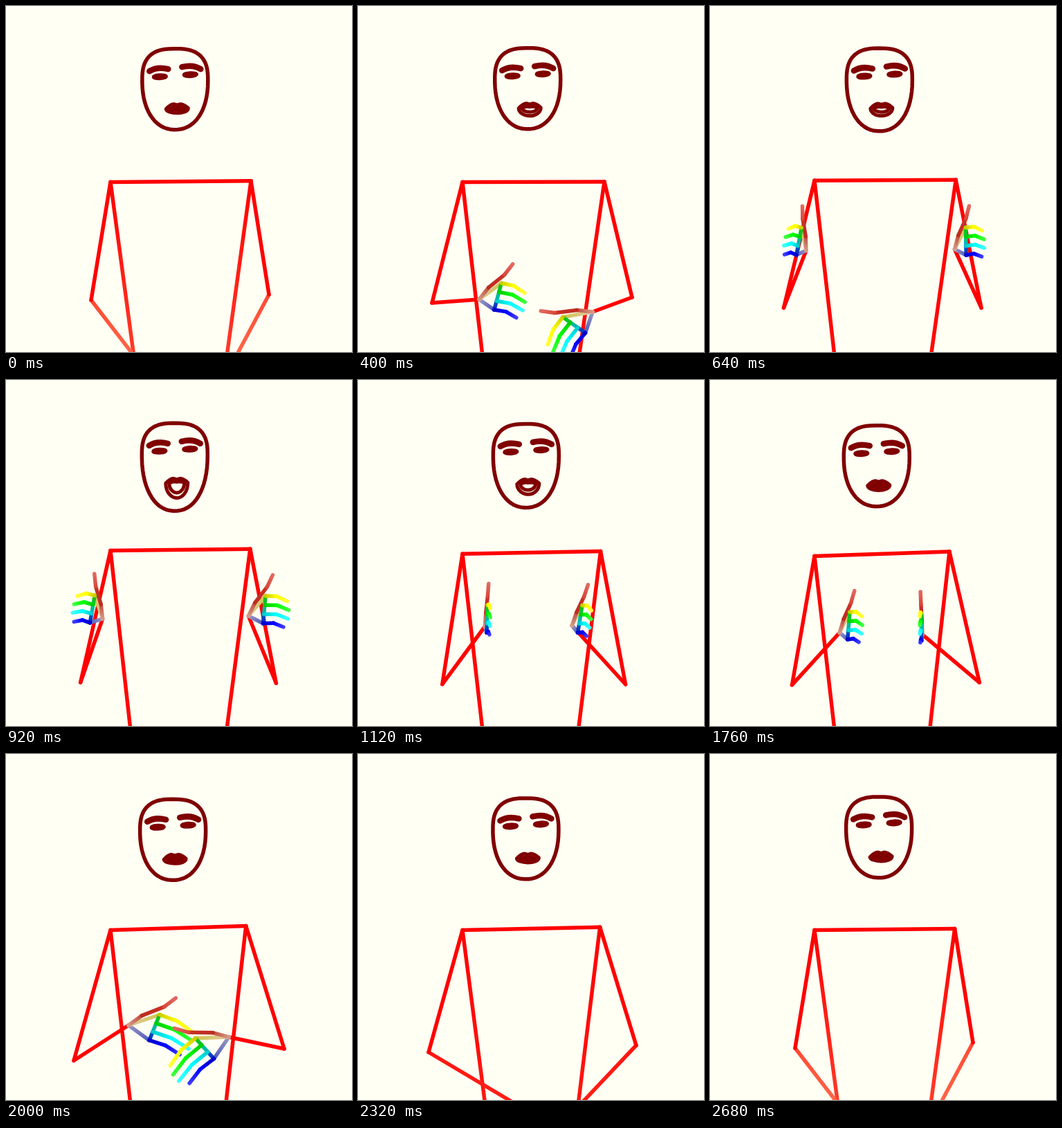
An HTML page with a canvas that plays this animation: 500x500 px, repeating every 2.72 s.

```html
<!DOCTYPE html>
<html lang="en">
<head>
<meta charset="utf-8">
<title>Gesturing figure</title>
<style>
html, body { margin: 0; width: 100%; height: 100%; overflow: hidden; background: #fffff4; }
canvas { display: block; width: 500px; height: 500px; }
</style>
</head>
<body>
<canvas id="stage" width="500" height="500"></canvas>
<script>
const ctx = document.getElementById('stage').getContext('2d');
const LOOP = 2720, STEP = 40, DARK = '#800000';

// turn: signed length of the visible palm; tilt: slope of the hand in degrees.
const arm = (elbow, wrist, turn, tilt) => ({ elbow, wrist, turn, tilt });
const rest = [arm([123, 425], [204, 530], 30, 90), arm([380, 417], [317, 535], -30, -90)];
const present = [arm([107, 429], [175, 424], 25, 15), arm([396, 421], [339, 442], -31, -55)];
const open = [arm([108, 437], [141, 345], -17, 10), arm([390, 438], [349, 341], 22, 5)];
const front = [arm([124, 440], [190, 358], 6, 0), arm([386, 440], [303, 357], 8, 10)];
const clasp = [arm([98, 443], [177, 392], 36, 22), arm([402, 426], [322, 409], -37, -42)];
const lower = [arm([102, 431], [235, 510], 30, 90), arm([402, 421], [315, 513], -30, -90)];

const timeline = [[0, rest], [400, present], [700, open], [920, open], [1180, front],
  [1660, front], [2000, clasp], [2320, lower], [2680, rest], [LOOP, rest]];

const mix = (a, b, u) => a + (b - a) * u;
const between = (p, q, u) => [mix(p[0], q[0], u), mix(p[1], q[1], u)];
const bump = (t, center, width) => Math.exp(-(((t - center) / width) ** 2));
const tint = f => `rgb(255, ${Math.round(235 * f)}, ${Math.round(165 * f)})`;
const hsl = (hue, light, sat = 100) => `hsl(${hue}, ${sat}%, ${light}%)`;

function armsAt(t) {
  const next = timeline.findIndex(([time]) => time > t);
  const [t0, from] = timeline[next - 1], [t1, to] = timeline[next];
  const u = (t - t0) / (t1 - t0), e = u * u * (3 - 2 * u);
  const spread = bump(t, 760, 90);
  return from.map((a, i) => {
    const b = to[i], out = i ? spread : -spread;
    const elbow = between(a.elbow, b.elbow, e), wrist = between(a.wrist, b.wrist, e);
    elbow[0] += 8 * out;
    wrist[0] += 33 * out;
    return arm(elbow, wrist, mix(a.turn, b.turn, e), mix(a.tilt, b.tilt, e));
  });
}

function stroke(color, width) {
  ctx.strokeStyle = color;
  ctx.lineWidth = width;
  ctx.stroke();
}

function line(a, b, from, to = from) {
  const g = ctx.createLinearGradient(...a, ...b);
  g.addColorStop(0, from);
  g.addColorStop(1, to);
  ctx.beginPath();
  ctx.moveTo(...a);
  ctx.lineTo(...b);
  stroke(g, 5.5);
}

function outline(jaw) {
  const power = (x, n) => Math.sign(x) * Math.abs(x) ** (2 / n);
  ctx.beginPath();
  for (let a = 0; a < 2 * Math.PI; a += .1) {
    const s = Math.sin(a), n = s > 0 ? 2.2 : 2.7;
    ctx.lineTo(245 + 47.5 * power(Math.cos(a), n), 108 + (s > 0 ? 71 + jaw : 46) * power(s, n));
  }
  ctx.closePath();
  stroke(DARK, 5.5);
}

function lips(w, up, down) {
  ctx.beginPath();
  ctx.moveTo(-w, 0);
  ctx.quadraticCurveTo(-.6 * w, -up, -.3 * w, -up);
  ctx.lineTo(0, -.8 * up);
  ctx.lineTo(.3 * w, -up);
  ctx.quadraticCurveTo(.6 * w, -up, w, -1);
  ctx.bezierCurveTo(w, down * .6, .5 * w, down, 0, down);
  ctx.bezierCurveTo(-.5 * w, down, -w, down * .6, -w, 0);
  ctx.closePath();
  stroke(DARK, 5);
}

function drawFace(x, y, jaw, mouth) {
  ctx.save();
  ctx.translate(x, y);
  outline(jaw);
  for (const side of [-1, 1]) {
    const cx = 245 + 22 * side, lift = 1.5 * side;
    ctx.beginPath();
    ctx.ellipse(cx, 101 - lift, 9, 2.4, -.05, 0, 7);
    stroke(DARK, 5.2);
    ctx.beginPath();
    ctx.moveTo(cx + 15 * side, 93 - lift);
    ctx.quadraticCurveTo(cx + 4 * side, 86 - lift, cx - 12 * side, 90 - lift);
    stroke(DARK, 8.5);
  }
  ctx.translate(248, 149);
  lips(16, 7, 6 + mouth);
  lips(11, 2.5, 1.5 + mouth * .8);
  ctx.restore();
}

function drawHand({ wrist, turn, tilt }) {
  const angle = tilt * Math.PI / 180, c = Math.cos(angle), s = Math.sin(angle);
  // along runs in palm lengths, up in pixels towards the thumb
  const at = (along, up) =>
    [wrist[0] + turn * along * c + up * s, wrist[1] + turn * along * s - up * c];
  const bases = [0, 1, 2, 3].map(i => at(1, 31 - 13.3 * i));
  const thumb = [at(.35, 20), at(1.05, 44), at(1.35, 62)];

  line(wrist, bases[3], '#9a9ac4', '#5058bc');
  line(wrist, bases[0], '#e0c8a0', '#d2c650');
  line(wrist, thumb[0], '#d69a88', '#c04a3c');
  line(thumb[0], thumb[1], '#bc2c20', '#cc3226');
  line(thumb[1], thumb[2], '#d8483c', '#e26a60');
  bases.slice(1).forEach((b, i) => line(bases[i], b, hsl(110 + 50 * i, 38), hsl(140 + 45 * i, 38)));
  bases.forEach((base, i) => {
    const hue = 60 * (i + 1), length = 2.45 + (i % 3 ? .15 : -.1 * (i / 3));
    const knee = at(mix(1, length, .5), 32 - 13 * i), tip = at(length, 26 - 12.5 * i);
    line(base, knee, hsl(hue, 40), hsl(hue, 50));
    line(knee, tip, hsl(hue, 50), hsl(hue, 62));
  });
}

function draw(t) {
  const arms = armsAt(t);
  const sway = Math.cos(2 * Math.PI * (t - 400) / LOOP);
  const raise = bump(t, 900, 230);
  const shoulderY = 254.5 - 8 * raise;
  const shoulders = [[151, shoulderY], [351 + 5 * sway, shoulderY - 3.5 + 3 * sway]];
  const drop = Math.max(0, (arms[0].wrist[1] - 440) / 95);
  const fade = .55 * drop ** 5;

  ctx.fillStyle = '#fffff4';
  ctx.fillRect(0, 0, 500, 500);
  ctx.lineCap = ctx.lineJoin = 'round';

  arms.forEach(({ elbow, wrist }, i) => {
    const hip = [i ? 319 + sway : 179.5 + 5 * drop, 502];
    line(shoulders[i], hip, tint(0), tint(.04 + fade / 2));
    line(elbow, wrist, tint(fade * .75), tint(fade * 1.15));
    line(shoulders[i], elbow, tint(0));
  });
  line(...shoulders, tint(0));

  const mouth = 5 * bump(t, 400, 200) + 15 * bump(t, 920, 230) + 8 * bump(t, 1400, 230);
  drawFace(2.2 * sway - 2, 1.2 - 2.5 * sway, 10 * raise, mouth);
  arms.forEach(drawHand);
}

const start = performance.now();
function tick() {
  const t = (performance.now() - start) % LOOP;
  draw(Math.floor(t / STEP) * STEP);
  requestAnimationFrame(tick);
}
tick();
</script>
</body>
</html>
```
